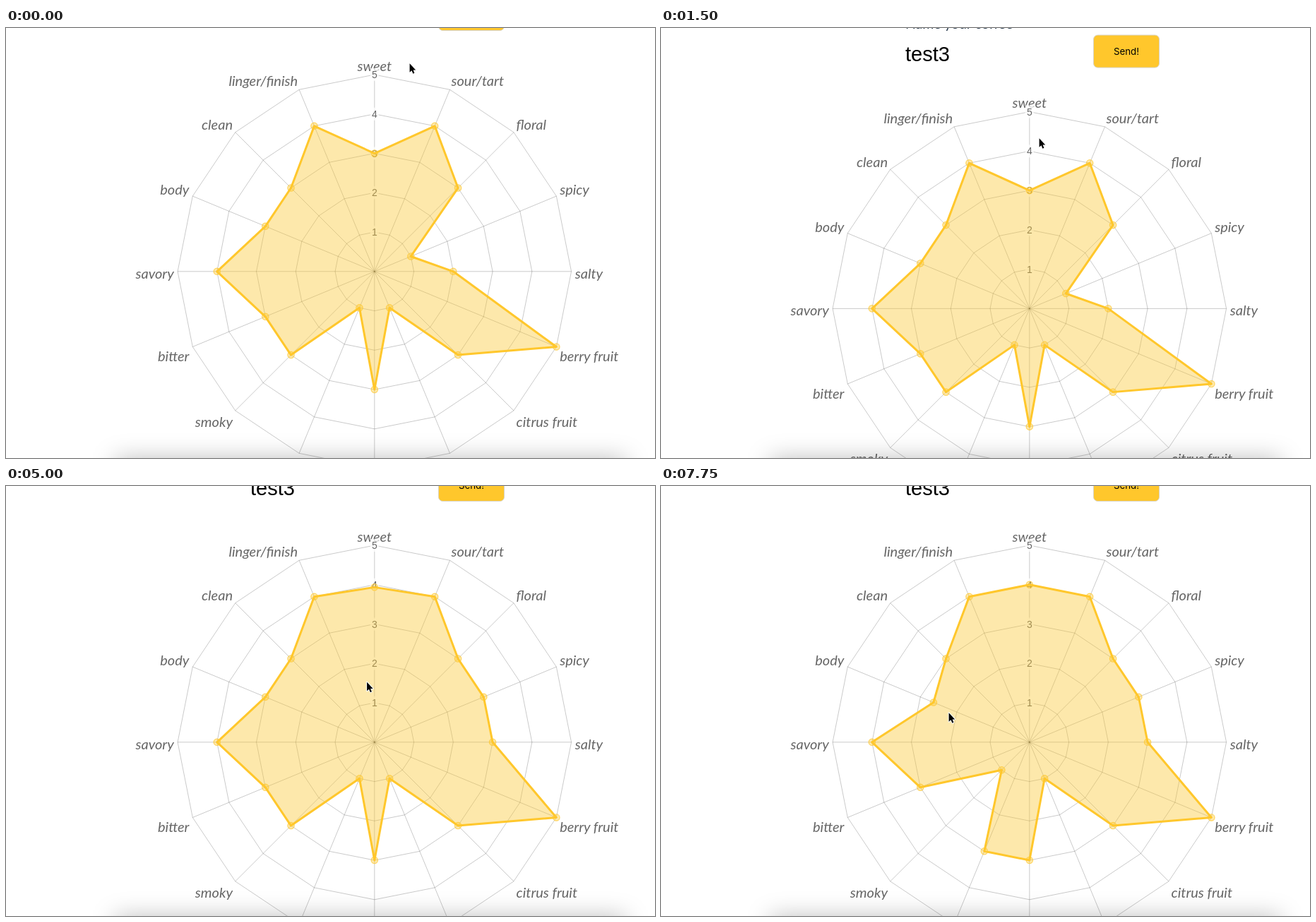
These frames come from a looping animation (919x609 px, 8 s). An HTML page:

```html
<!DOCTYPE html>
<html lang="en">
<head>
<meta charset="utf-8">
<title>Coffee Wheel</title>
<style>
  html, body { margin: 0; width: 100%; height: 100%; overflow: hidden; background: #fff; }
  svg { display: block; width: 100%; height: 100%; overflow: hidden; }
  text { font-variant-ligatures: none; }
  .ui { font: 16px Lato, sans-serif; fill: #111; }
  .slate { fill: #2c3e50; }
  .title { font-size: 23.8px; font-weight: 700; text-anchor: middle; }
  .name { font-size: 19.5px; }
  .input { font: 29px "Liberation Sans", Arial, sans-serif; fill: #000; }
  .send { font: 13.3px Inter, sans-serif; fill: #000; text-anchor: middle; }
  .flavor { font: italic 20px Lato, sans-serif; fill: #666; }
  .tick { font: 14px "Liberation Sans", Arial, sans-serif; fill: #666; text-anchor: middle; }
  .grid { fill: none; stroke: #000; stroke-opacity: .21; }
  #area { fill: #f9c62e; fill-opacity: .4; stroke: #ffc72c; stroke-width: 3; stroke-linejoin: round; }
  .dot { fill: #ffc72c; fill-opacity: .4; stroke: #ffc72c; stroke-opacity: .7; stroke-width: 1.2; }
  #cursor { stroke: #fff; stroke-width: 2; stroke-linejoin: round; paint-order: stroke; }
  #shade { fill-opacity: .28; filter: blur(17px); }
</style>
</head>
<body>
<svg viewBox="0 0 919 609">
  <!-- The page is laid out around the centre of the wheel. -->
  <g id="page">
    <g class="ui">
      <rect y="-800" width="919" height="273" fill="#fff4ea"/>
      <path d="M509.5 -566q3 2.2 6 0" fill="none" stroke="#2c3e50" stroke-width="1.5"/>
      <text x="366" y="-533">Go to List!</text>
      <text x="483" y="-533">Create New</text>
      <text x="611" y="-533">Log out</text>
      <text class="slate title" x="514.5" y="-475">Coffee Wheel</text>
      <text class="slate name" x="346" y="-396">Name your coffee</text>
      <text class="input" x="346" y="-350">test3</text>
      <rect x="612.5" y="-387.3" width="93" height="46" rx="6" fill="#ffc72c" stroke="#d8d3c4"/>
      <text class="send" x="659" y="-359">Send!</text>
    </g>
    <g id="wheel" transform="translate(521.8)"></g>
  </g>
  <rect id="shade" x="155" y="611" width="722" height="60"/>
  <path id="cursor" d="M0 0V12.5L2.9 9.9L4.8 14.4L6.8 13.5L5 9.2H8.6Z"/>
</svg>
<script>
const STEP = 250, LOOP = 8000, RING = 55.75;
const flavors = ["sweet", "sour/tart", "floral", "spicy", "salty", "berry fruit", "citrus fruit", "", "",
  "", "smoky", "bitter", "savory", "body", "clean", "linger/finish"];
const scores = [3, 4, 3, 1, 2, 5, 3, 1, 3, 1, 3, 3, 4, 3, 3, 4];

// Moves ease to a target value from a start time, both times in ms.
const scrolls = [{ at: 500, ms: 828, to: 564.4 }, { at: 1300, ms: 450, to: 362.8 }];
const drags = [
  { axis: 3, at: 3050, to: 3 },
  { axis: 4, at: 3710, to: 3 },
  { axis: 0, at: 4550, to: 4 },
  { axis: 9, at: 5398, to: 3 },
  { axis: 10, at: 6050, to: 1 },
  { axis: 13, at: 7646, to: 2 }
];

// Pointer stops: time, x, y.
const stops = [[0, 571, 49], [250, 535, 155], [1750, 535, 155], [2500, 668, 312], [3000, 575, 335],
  [3500, 674, 300], [4000, 618, 299], [4500, 522, 192], [4750, 522, 141], [5250, 499, 412],
  [5750, 437, 497], [6500, 481, 402], [7250, 368, 299], [7750, 407, 320]];

const $ = id => document.getElementById(id);
const wheel = $("wheel");

function add(tag, attrs, text = "") {
  const el = document.createElementNS("http://www.w3.org/2000/svg", tag);
  for (const key in attrs) el.setAttribute(key, attrs[key]);
  el.textContent = text;
  return wheel.appendChild(el);
}

function polar(axis, radius) {
  const angle = axis * Math.PI / 8;
  return [Math.sin(angle) * radius, -Math.cos(angle) * radius];
}

const outline = values => values.map((v, i) => polar(i, v * RING).map(n => n.toFixed(2))).join(" ");
const clamp = p => Math.min(1, Math.max(0, p));
const easeOut = p => 1 - (1 - p) ** 3;

function moved(value, moves, time) {
  for (const { at, to, ms = 750 } of moves)
    value += (to - value) * easeOut(clamp((time - at) / ms));
  return value;
}

function pointerAt(time) {
  const next = stops.findIndex(stop => stop[0] >= time);
  const [t1, x1, y1] = stops[next];
  const [t0, x0, y0] = stops[Math.max(0, next - 1)];
  const p = t1 > t0 ? (time - t0) / (t1 - t0) : 1;
  return [x0 + (x1 - x0) * p, y0 + (y1 - y0) * p];
}

for (let ring = 1; ring <= 5; ring++)
  add("polygon", { class: "grid", points: outline(flavors.map(() => ring)) });

flavors.forEach((flavor, i) => {
  const [ex, ey] = polar(i, 5 * RING);
  add("path", { class: "grid", d: `M0 0L${ex} ${ey}` });
  const [x, y] = polar(i, 284);
  const drop = Math.abs(y) < 1 ? 10 : y > 0 ? 19 : 0;
  const anchor = Math.abs(x) < 1 ? "middle" : x > 0 ? "start" : "end";
  add("text", { class: "flavor", x, y: y + drop, "text-anchor": anchor }, flavor);
});

for (let ring = 1; ring <= 5; ring++) {
  add("rect", { x: -6, y: -ring * RING - 9, width: 12, height: 18, fill: "#fff", "fill-opacity": .75 });
  add("text", { class: "tick", x: 0, y: -ring * RING + 5 }, ring);
}

const area = add("polygon", { id: "area" });
const dots = scores.map(() => add("circle", { class: "dot", r: 4.7 }));

function draw(time) {
  const values = scores.map((score, i) => moved(score, drags.filter(drag => drag.axis === i), time));
  area.setAttribute("points", outline(values));
  dots.forEach((dot, i) => {
    const [x, y] = polar(i, values[i] * RING);
    dot.setAttribute("cx", x);
    dot.setAttribute("cy", y);
  });
  const [x, y] = pointerAt(time);
  $("cursor").setAttribute("transform", `translate(${x + .6} ${y + 1.3})`);
  $("page").setAttribute("transform", `translate(0 ${moved(344.8, scrolls, time)})`);
}

const start = performance.now();
let shown = -1;

// The picture advances in quarter-second steps.
function tick() {
  const step = Math.floor((performance.now() - start) % LOOP / STEP);
  if (step !== shown) draw((shown = step) * STEP);
  requestAnimationFrame(tick);
}
tick();
</script>
</body>
</html>
```
